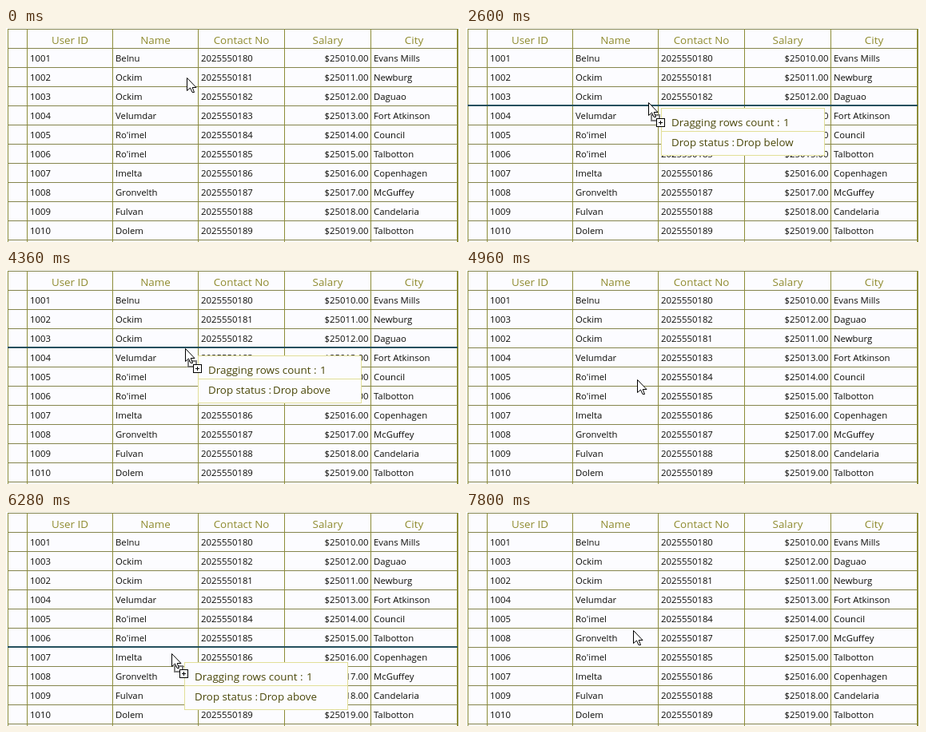
Write an HTML page with a canvas that moves like this. It is 568x268 px and loops after 8000 ms.

```html
<!DOCTYPE html>
<html lang="en">
<head>
<meta charset="utf-8">
<title>Row drag and drop</title>
<style>
  html, body { margin: 0; width: 100%; height: 100%; overflow: hidden; background: #fff; }
  canvas { display: block; }
</style>
</head>
<body>
<canvas id="stage" width="568" height="268"></canvas>
<script>
const ctx = document.getElementById('stage').getContext('2d');
const LOOP = 8000, STEP = 40, TOP = 25, ROW = 24;
const FAMILY = '"Open Sans", "Noto Sans", sans-serif';
const EDGES = [2, 26, 133, 240, 348, 456, 564];
const HEADERS = ['User ID', 'Name', 'Contact No', 'Salary', 'City'];
const NAMES = ['Belnu', 'Ockim', 'Ockim', 'Velumdar', "Ro'imel", "Ro'imel", 'Imelta', 'Gronvelth', 'Fulvan', 'Dolem'];
const CITIES = ['Evans Mills', 'Newburg', 'Daguao', 'Fort Atkinson', 'Council', 'Talbotton',
  'Copenhagen', 'McGuffey', 'Candelaria', 'Talbotton'];
const ROWS = NAMES.map((name, i) =>
  [`${1001 + i}`, name, `${2025550180 + i}`, `$${25010 + i}.00`, CITIES[i]]);

// Pointer path: time, x, y
const PATH = [
  [0, 226, 62], [1759, 226, 62], [1760, 225, 62], [2000, 225, 62],
  [2560, 228, 91], [2600, 228, 93], [2840, 228, 95], [3080, 228, 91], [4080, 228, 91],
  [4320, 224, 98], [4360, 224, 98], [4520, 224, 101], [4680, 224, 101],
  [5440, 198, 199], [5720, 198, 199], [5840, 201, 197], [5880, 202, 196],
  [6440, 209, 170], [6560, 209, 170], [6760, 209, 167], [7200, 209, 148], [LOOP, 209, 148]
];
const DRAGS = [
  { start: 2120, end: 4680, from: 1, to: 2 },
  { start: 5800, end: 7760, from: 7, to: 5 }
];

function pointerAt(t) {
  const i = Math.max(1, PATH.findIndex(key => key[0] >= t));
  const [t0, x0, y0] = PATH[i - 1], [t1, x1, y1] = PATH[i];
  const k = (t - t0) / (t1 - t0);
  return { x: Math.round(x0 + (x1 - x0) * k), y: Math.round(y0 + (y1 - y0) * k) };
}

function rowsAt(t) {
  const rows = [...ROWS];
  for (const { end, from, to } of DRAGS) {
    if (t >= end + STEP) rows.splice(to, 0, rows.splice(from, 1)[0]);
  }
  return rows;
}

function box(color, x, y, w, h) {
  ctx.fillStyle = color;
  ctx.fillRect(x, y, w, h);
}

function label(text, x, y, size, color, align = 'left') {
  ctx.font = `${size}px ${FAMILY}`;
  ctx.fillStyle = color;
  ctx.textAlign = align;
  ctx.fillText(text, x, y);
}

function drawGrid(rows) {
  box('#fff', 0, 0, 568, 268);
  box('#fcfcff', 2, 1, 563, 267);
  for (let y = 1; y < 268; y += ROW) box('#85854d', 2, y, 563, 1);
  for (const x of EDGES) box('#8c8c38', x, 1, x === 564 ? 2 : 1, 267);
  HEADERS.forEach((text, i) =>
    label(text, (EDGES[i + 1] + EDGES[i + 2]) / 2 + 0.5, 20, 13.4, '#8f8b2e', 'center'));
  rows.forEach((cells, r) => cells.forEach((text, c) => {
    const right = c === 3;
    label(text, right ? EDGES[c + 2] - 2.5 : EDGES[c + 1] + 4, TOP + r * ROW + 17, 11.35,
      '#0c0c08', right ? 'right' : 'left');
  }));
}

function drawPopup(x, y, status) {
  const ink = '#4a4708', rule = '#e2df98';
  box(rule, x, y, 205, 60);
  box('#fcfcff', x + 1, y + 1, 203, 58);
  box(rule, x + 1, y + 29, 203, 1);
  label('Dragging rows count :', x + 13, y + 23, 13.4, ink);
  label('1', x + 153, y + 23, 13.4, ink);
  label('Drop status :', x + 13, y + 48, 13.3, ink);
  label(status, x + 94, y + 48, 13.3, ink);
}

function drawPointer({ x, y }, dragging, canDrop) {
  ctx.save();
  ctx.translate(x + 0.5, y + 0.5);
  ctx.lineWidth = 1;
  ctx.strokeStyle = '#000';
  if (dragging) {
    box('#fff', 2, 15, 12, 8);
    ctx.setLineDash([1, 1]);
    ctx.strokeRect(3, 15, 11, 8);
    ctx.strokeRect(4, 16, 9, 6);
    ctx.setLineDash([]);
  }
  ctx.fillStyle = '#fff';
  const arrow = new Path2D('M0 0V16L4 12.5L6.5 18H9L6.7 12H11.5Z');
  ctx.fill(arrow);
  ctx.stroke(arrow);
  if (canDrop) {
    box('#fff', 10, 20, 10, 10);
    ctx.strokeRect(10, 20, 10, 10);
    box('#000', 12.5, 24.5, 5, 1);
    box('#000', 14.5, 22.5, 1, 5);
  }
  ctx.restore();
}

function draw(t) {
  const pointer = pointerAt(t);
  const drag = DRAGS.find(d => t >= d.start && t < d.end);
  const popupShown = drag && !(t >= 6760 && t < 6800);
  const place = (pointer.y - TOP) / ROW, hovered = Math.floor(place);
  const canDrop = popupShown && hovered !== drag.from;

  drawGrid(rowsAt(t));
  if (canDrop) box('#24505e', 2, TOP + Math.round(place) * ROW - 1, 563, 2);
  if (popupShown) {
    // The popup trails the pointer by one step.
    const { x, y } = pointerAt(t - STEP);
    const status = !canDrop ? 'Cannot drop here' : place - hovered < 0.5 ? 'Drop above' : 'Drop below';
    drawPopup(x + 16, y + 9, status);
  }
  drawPointer(pointer, drag, canDrop);
}

const began = performance.now();
function tick() {
  const t = (performance.now() - began) % LOOP;
  draw(Math.floor(t / STEP) * STEP);
  requestAnimationFrame(tick);
}
tick();
</script>
</body>
</html>
```
